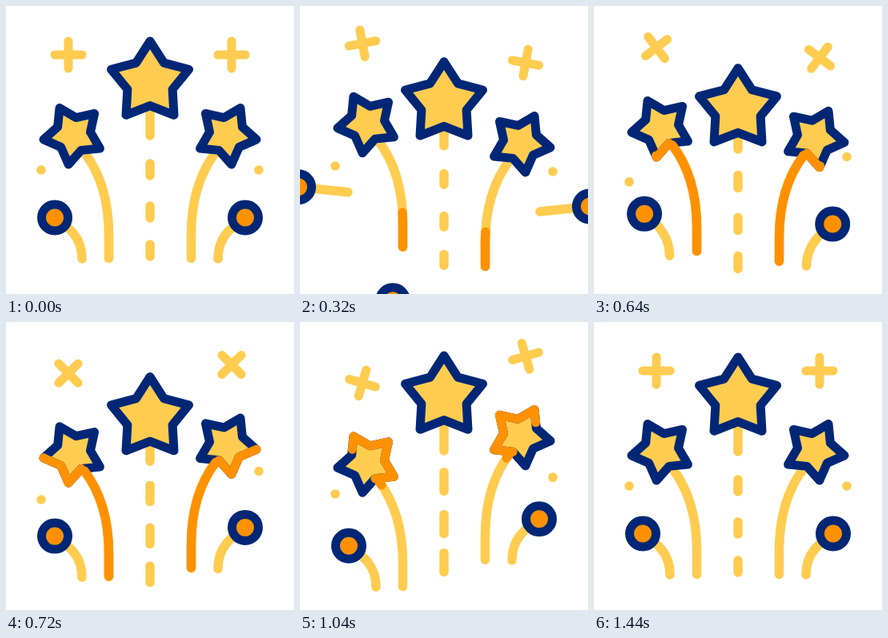
Animation of 360 by 360 pixels, one loop 1.48 s. Source, as an HTML page:

```html
<!DOCTYPE html>
<html lang="en">
<head>
<meta charset="utf-8">
<title>Fireworks</title>
<style>
  html, body { margin: 0; width: 100%; height: 100%; overflow: hidden; background: #fff; }
  svg { display: block; width: 100%; height: 100%; fill: none; stroke-linecap: round; stroke-linejoin: round; }
</style>
</head>
<body>
<svg id="stage" viewBox="0 0 360 360"></svg>
<script>
const LOOP = 1480, STEP = 40, END = 1440;
const YELLOW = '#ffcc50', ORANGE = '#ff9100', NAVY = '#002776';

const BIG_STAR = star(180, 95, 51, 90);
const SMALL_STAR = star(84, 161, 37.5, 63);
const STEM = 'M128.5 315.5V286C128.5 250 120 212 98 183';

// Both sides share one drawing; the right one is mirrored
const LEFT = { rise: -20, fall: 18.5, dotRise: -5, dotFall: 17, drift: 55 };
const RIGHT = { rise: 14, fall: -22, dotRise: 2, dotFall: -18.5, drift: 20 };

// Five-pointed star, clockwise from the notch at the given angle
function star(cx, cy, radius, degrees) {
  const points = [];
  for (let i = 0; i < 10; i++) {
    const a = (degrees + 36 * i) * Math.PI / 180, r = i % 2 ? radius : radius * 0.58;
    points.push(`${cx + r * Math.cos(a)} ${cy + r * Math.sin(a)}`);
  }
  return `M${points.join('L')}Z`;
}

function ease(t, from, to) {
  const u = Math.max(0, Math.min(1, (t - from) / (to - from)));
  return (1 - Math.cos(Math.PI * u)) / 2;
}

// From 0 to a at t1, to b at t2, and back to 0
const sway = (t, t1, a, t2, b) =>
  a * ease(t, 0, t1) + (b - a) * ease(t, t1, t2) - b * ease(t, t2, END);

const line = (d, color, width = 11, fill = 'none', extra = '') =>
  `<path d="${d}" stroke="${color}" stroke-width="${width}" fill="${fill}" ${extra}/>`;

const trim = (d, start, end, width) => end - start < 0.002 ? '' :
  line(d, ORANGE, width, 'none', `pathLength="1" stroke-dasharray="${end - start} 9" stroke-dashoffset="${-start}"`);

const comet = (x, y, tailX, tailY, bend) =>
  line(`M${tailX} ${tailY}C${tailX} ${tailY - 28 * bend} ${x + 17 * bend} ${y + 12 * bend} ${x} ${y}`, YELLOW, 11.5)
  + `<circle cx="${x}" cy="${y}" r="16.5" fill="${ORANGE}" stroke="${NAVY}" stroke-width="11"/>`;

function leaving(t) {
  const u = (t / 320) ** 2.5, turn = Math.min(u, 1);
  return comet(61 - 63 * u, 264.5 - 24 * turn, 95 - 35 * u, 316 - 69 * turn, 1 - turn);
}

function arriving(t, drift) {
  const u = (Math.max(0, 680 - t) / 360) ** 1.5;
  return comet(61 + drift * u, 264.5 + 118 * u, 95 - 15 * u, 316 + 139 * u, Math.max(0, 1 - 2.7 * u));
}

function side(t, s) {
  return `<circle cx="44" cy="${205 + sway(t, 320, s.dotRise, 720, s.dotFall)}" r="5.8" fill="${YELLOW}"/>
    <g transform="translate(0 ${sway(t, 500, s.rise, 890, s.fall)})">
      <g transform="translate(78 61) rotate(${-90 * ease(t, 0, END)})">${line('M-17 0H17M0-17V17', YELLOW)}</g>
      ${line(STEM, YELLOW, 11.5)}
      ${line(SMALL_STAR, NAVY, 11, YELLOW)}
      ${trim(SMALL_STAR, ease(t, 725, 1416), ease(t, 530, 1044))}
      ${trim(STEM, ease(t, 700, 1095), ease(t, 175, 561), 11.5)}
      ${leaving(t)}
      ${arriving(t, s.drift)}
    </g>`;
}

function center(t) {
  const y = sway(t, 530, 39, 1000, -2);
  const top = sway(t, 530, 19, 960, -10), bottom = 15 + sway(t, 530, 17, 1100, -1);
  const dashes = [197, 250, 298].map(d => `M180 ${d + top}V${d + bottom}`).join('');
  return line(`M180 ${110 + y}V${162 + y / 2}${dashes}`, YELLOW, 11.5)
    + `<g transform="translate(0 ${y})">${line(BIG_STAR, NAVY, 11, YELLOW)}</g>`;
}

const stage = document.getElementById('stage');
const start = performance.now();
function draw() {
  let t = Math.floor((performance.now() - start) % LOOP / STEP) * STEP;
  if (t < 120) t = 0;
  stage.innerHTML = side(t, LEFT)
    + `<g transform="translate(360 0) scale(-1 1)">${side(t, RIGHT)}</g>`
    + center(t);
  requestAnimationFrame(draw);
}
draw();
</script>
</body>
</html>
```
